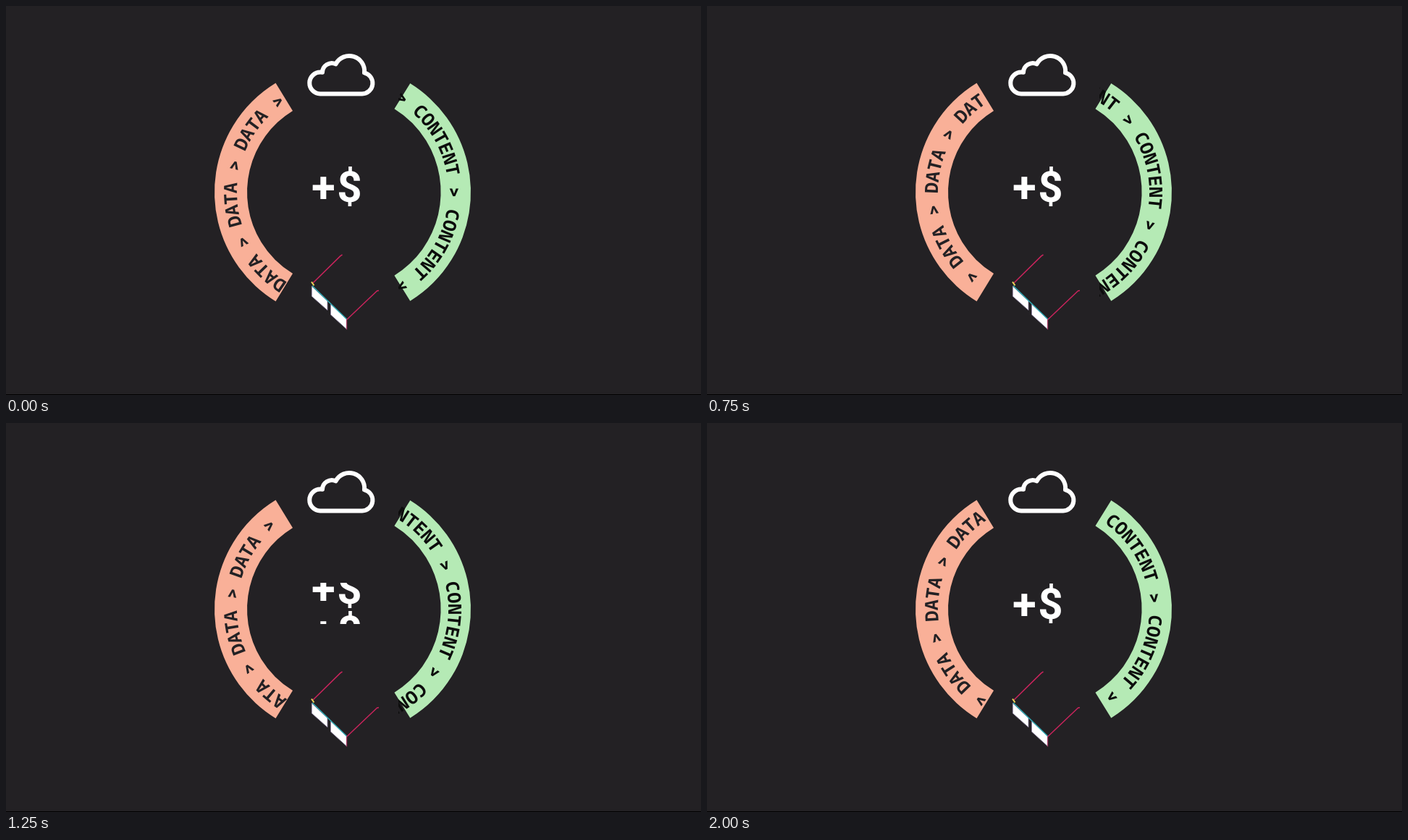
An HTML page with a canvas for the animation above (2.05 s loop, 960x538 px).

```html
<!DOCTYPE html>
<html lang="en">
<head>
<meta charset="utf-8">
<title>Data and content cycle</title>
<style>
  html, body { margin: 0; width: 100%; height: 100%; overflow: hidden; background: #232124; }
  canvas { display: block; }
</style>
</head>
<body>
<canvas id="stage" width="960" height="538"></canvas>
<script>
const ctx = document.getElementById('stage').getContext('2d');
const LOOP = 2050, BG = '#232124';
const CX = 465, CY = 257.5, BASELINE = 146;
const RAD = Math.PI / 180, PITCH = 5.785; // degrees per character
const LETTERS = '600 25px "Roboto Mono", "Noto Sans Mono", monospace';
const ARROW = 'bold 25px Roboto, sans-serif';

function band(inner, mid, half, color) {
  const from = (mid - half) * RAD, to = (mid + half) * RAD;
  ctx.beginPath();
  ctx.arc(CX, CY, 177, from, to);
  ctx.arc(CX, CY, inner, to, from, true);
  ctx.fillStyle = color;
  ctx.fill();
}

// Repeats a phrase clockwise around the ring, shifted by whole characters.
function ringText(phrase, start, first, last, shift, color) {
  const n = phrase.length;
  ctx.fillStyle = color;
  for (let slot = first; slot <= last; slot++) {
    const ch = phrase[((slot - shift) % n + n) % n];
    ctx.save();
    ctx.translate(CX, CY);
    ctx.rotate((start + slot * PITCH + 90) * RAD);
    ctx.font = ch === '>' ? ARROW : LETTERS;
    ctx.fillText(ch, 0, -BASELINE);
    ctx.restore();
  }
}

function clipped(x, y, w, h, draw) {
  ctx.save();
  ctx.beginPath();
  ctx.rect(x, y, w, h);
  ctx.clip();
  draw();
  ctx.restore();
}

function line(d, color, width) {
  ctx.strokeStyle = color;
  ctx.lineWidth = width;
  ctx.stroke(new Path2D(d));
}

function cloud() {
  line('M434 121.5A15 15 0 0 1 434.5 91.5L437 91.7A13 13 0 0 1 455.5 80.3' +
       'A21 21 0 0 1 495 92.3A14.8 14.8 0 0 1 492 121.5Z', '#fff', 6);
}

function lens(d) {
  ctx.fillStyle = '#fff';
  ctx.fill(new Path2D(d));
  line(d, '#8a7d9c', 0.8);
}

function glasses() {
  line('M423.5 383.5L462 345.6L464.5 344', '#c9245c', 1.5);
  line('M471 433.5L512.5 394L515 393.5', '#c9245c', 1.5);
  lens('M422.3 387.5L444 408V420.8L422.3 401.5Z');
  lens('M448.5 412L470.3 433V446.8L448.5 427Z');
  line('M423 387L470.5 433', '#2fa9b3', 1.5);
  line('M470.7 433.5V447.5', '#b8305f', 1);
  line('M422 381.5L425.5 386.5', '#e8d65a', 2);
}

function money(t) {
  const u = Math.min(1, Math.max(0, (t - 1050) / 500));
  const rise = 59 * u * u * (3 - 2 * u);
  ctx.font = 'bold 60px Roboto, sans-serif';
  ctx.fillStyle = '#fff';
  clipped(415, 221, 85, 57, () => {
    for (const y of [271 - rise, 330 - rise]) {
      ctx.fillText('+', 438.5, y);
      ctx.fillText('$', 474.5, y);
    }
  });
}

function draw(now) {
  const t = now % LOOP;
  const step = Math.min(9, Math.floor(t / 200));
  ctx.fillStyle = BG;
  ctx.fillRect(0, 0, 960, 538);
  ctx.fillStyle = '#000';
  ctx.fillRect(0, 537, 960, 1);

  band(132, 180, 58.5, '#f9b098');
  band(135.6, 0, 58.2, '#b5eab5');
  ringText('> DATA ', 193.86, -12, 7, step, BG);
  clipped(542, 90, 110, 335, () => ringText('> CONTENT ', 0, -11, 11, step, '#0c0c0c'));

  cloud();
  glasses();
  money(t);
}

ctx.textAlign = 'center';
ctx.lineJoin = 'round';
const begin = performance.now();
function tick() {
  draw(performance.now() - begin);
  requestAnimationFrame(tick);
}
tick();
</script>
</body>
</html>
```
